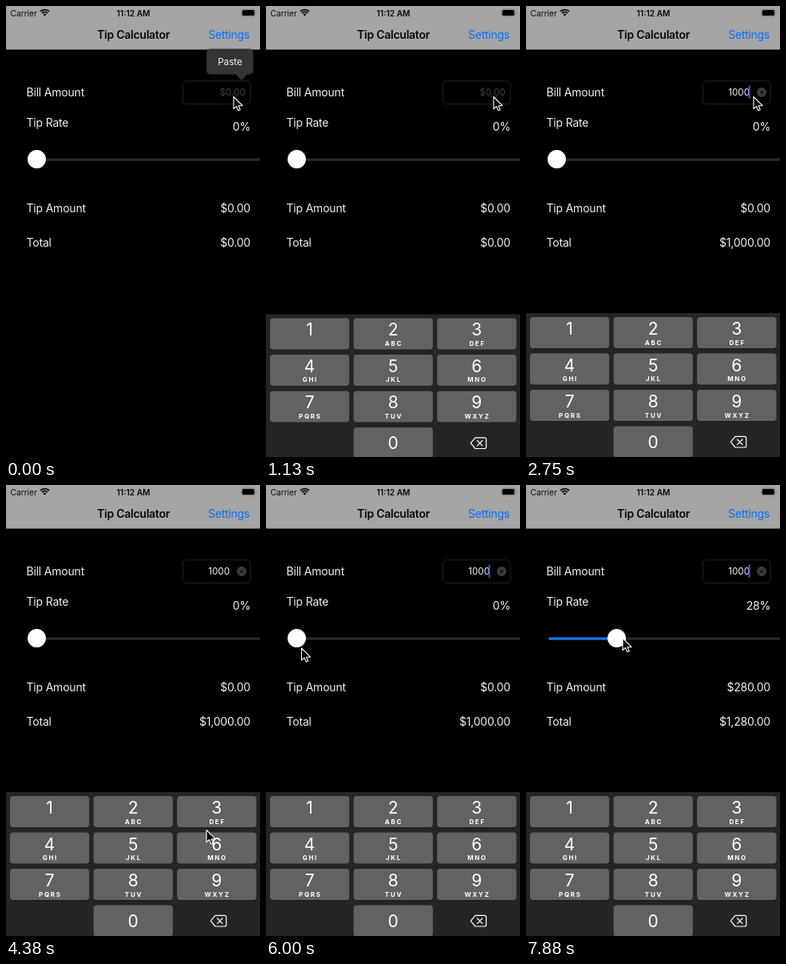
Recreate the animation shown at these times as an HTML page. Size 318x564 px, loop 8000 ms.

```html
<!DOCTYPE html>
<html lang="en">
<head>
<meta charset="utf-8">
<title>Tip Calculator</title>
<style>
  html, body { margin: 0; width: 100%; height: 100%; overflow: hidden; background: #000; }
  svg { display: block; width: 100vw; height: 100vh; }
  text { font: 14px Inter, Roboto, sans-serif; letter-spacing: -.2px; fill: #f2f2f2; }
  .end { text-anchor: end; }
  .mid { text-anchor: middle; }
  .status { font-size: 10.2px; letter-spacing: 0; fill: #0a0a0a; }
  .bold { font-weight: 600; }
  .title { letter-spacing: -.25px; fill: #080808; }
  .link { letter-spacing: -.25px; fill: #0570f2; }
  .small { font-size: 11.7px; letter-spacing: 0; }
  .digit { font-size: 21px; letter-spacing: 0; fill: #fff; }
  .letters { font-size: 8px; font-weight: 700; letter-spacing: 1.7px; fill: #fff; }
</style>
</head>
<body>
<svg viewBox="0 0 318 564">
  <rect width="318" height="564"/>
  <rect width="318" height="54.5" fill="#a5a5a5"/>

  <text class="status" x="5.5" y="12.5">Carrier</text>
  <g fill="none" stroke="#0a0a0a" stroke-width="1.9">
    <path d="M42.9 6.9A8 8 0 0 1 54.1 6.9"/>
    <path d="M45 9A5 5 0 0 1 52 9"/>
    <path d="M46.5 10.6A2.8 2.8 0 0 1 50.5 10.6L48.5 12.7Z" fill="#0a0a0a" stroke="none"/>
  </g>
  <text class="status bold mid" x="159.5" y="12.5">11:12 AM</text>
  <rect x="294.8" y="4" width="17" height="9" rx="2.4" fill="none" stroke="#747474" stroke-width=".8"/>
  <rect x="295.8" y="5" width="15" height="7" rx="1.5"/>
  <path d="M312.9 7A1.6 1.6 0 0 1 312.9 10Z" fill="#747474"/>

  <text class="title bold mid" x="159.5" y="41">Tip Calculator</text>
  <text class="link end" x="305" y="41">Settings</text>

  <text x="25.5" y="113.2">Bill Amount</text>
  <text x="25.5" y="150.5">Tip Rate</text>
  <text x="25.5" y="258.2">Tip Amount</text>
  <text x="25.5" y="300.7">Total</text>
  <text class="end" id="rate" x="306" y="156.3"></text>
  <text class="end" id="tip" x="306" y="258.2"></text>
  <text class="end" id="total" x="306" y="300.7"></text>

  <rect x="221.5" y="93.8" width="84.5" height="28.8" rx="4" fill="#000" stroke="#202022"/>
  <text class="small end" id="bill" y="112.2"></text>
  <rect id="caret" y="99.6" width="1.9" height="16.2" rx=".8" fill="#3566e6"/>
  <g id="clear">
    <circle cx="295" cy="108" r="6" fill="#3c3c3e"/>
    <path d="M292.8 105.8l4.4 4.4m0-4.4l-4.4 4.4" stroke="#000" stroke-width="1"/>
  </g>

  <rect x="28" y="190.4" width="290" height="3.4" fill="#29292b"/>
  <rect id="fill" x="28" y="190.4" height="3.4" rx="1.7" fill="#1a70ea"/>
  <circle id="thumb" cy="191.6" r="11.5" fill="#fff"/>

  <g id="paste">
    <path d="M256 53.5H304.5a5 5 0 0 1 5 5V80.5a5 5 0 0 1-5 5H302L295 93L288 85.5H256a5 5 0 0 1-5-5V58.5a5 5 0 0 1 5-5Z" fill="#343635"/>
    <text class="small mid" x="280.5" y="73.8">Paste</text>
  </g>

  <g id="keyboard">
    <rect y="384" width="318" height="184" fill="#252525"/>
    <g id="keys"></g>
    <g fill="none" stroke="#fff" stroke-width="1.2" stroke-linejoin="round">
      <path d="M262 538.4H273.7a2 2 0 0 1 2 2V550a2 2 0 0 1-2 2H262L256.3 545.2Z"/>
      <path d="M264.5 542l6.4 6.4m0-6.4l-6.4 6.4" stroke-linecap="round"/>
    </g>
  </g>

  <path id="pointer" d="M0 0V15.2L3.5 12L5.8 17.2L8.2 16.2L6 11.2H11Z" fill="#000" stroke="#fff" stroke-width="1.1" stroke-linejoin="round"/>
</svg>
<script>
const LOOP = 8000, STEP = 125;
const el = id => document.getElementById(id);
const clamp = v => Math.max(0, Math.min(1, v));
const money = v => '$' + v.toLocaleString('en-US', { minimumFractionDigits: 2, maximumFractionDigits: 2 });

// Keypad
const letters = ['', 'ABC', 'DEF', 'GHI', 'JKL', 'MNO', 'PQRS', 'TUV', 'WXYZ'];
const key = (col, row, digit, sub) => {
  const x = 5 + col * 104.6, y = 389 + row * 45.5, cx = x + 49.6;
  return `<rect x="${x}" y="${y + .8}" width="99.3" height="39" rx="4" fill="#181818"/>
    <rect x="${x}" y="${y}" width="99.3" height="39" rx="4" fill="#626262"/>
    <text class="digit mid" x="${cx}" y="${y + (digit ? 22 : 27)}">${digit}</text>
    <text class="letters mid" x="${cx + .8}" y="${y + 34.5}">${sub}</text>`;
};
el('keys').innerHTML =
  letters.map((sub, i) => key(i % 3, Math.floor(i / 3), i + 1, sub)).join('') + key(1, 3, 0, '');

// Pointer stops: time, x, y
const stops = [
  [0, 285, 113.5], [3600, 285, 113.5], [4375, 251, 431.5], [4750, 253, 448],
  [5250, 290, 279], [6000, 44.5, 204], [6250, 44.5, 204], [6400, 46, 196]
];

// Tip rate set by the slider
const slide = t => 28 * clamp((t - 6400) / 1475) ** 2;
const thumbX = t => 38.5 + 2.68 * slide(t);

function pointerAt(t) {
  const next = stops.findIndex(s => s[0] > t);
  if (next < 0) return [thumbX(t) + 7.5, 196 - 4.5 * clamp((t - 6400) / 900)];
  const [t0, x0, y0] = stops[next - 1], [t1, x1, y1] = stops[next];
  const u = (t - t0) / (t1 - t0), e = u * u * (3 - 2 * u);
  return [x0 + (x1 - x0) * e, y0 + (y1 - y0) * e];
}

function caretAt(t) {
  if (t >= 2000 && t < 2900) return 1;
  const phase = (t - (t < 2000 ? 0 : 100)) % 1000;
  return clamp(1 - (Math.abs(phase - 750) - 150) / 150);
}

// Critically damped rise of the keyboard
function keyboardAt(t) {
  const x = 0.01826 * Math.max(0, t - 749);
  return 182 * (1 + x) * Math.exp(-x);
}

function draw(t) {
  const typed = '1000'.slice(0, Math.max(0, Math.floor((t - 1750) / 250)));
  const bill = Number(typed), rate = Math.round(slide(t)), tip = bill * rate / 100;
  el('bill').textContent = typed || '$0.00';
  el('bill').setAttribute('x', typed ? 280 : 300);
  el('bill').style.fill = typed ? '#f2f2f2' : '#414143';
  el('clear').style.opacity = typed ? 1 : 0;
  el('caret').setAttribute('x', typed ? 278.6 : 298.8);
  el('caret').style.opacity = caretAt(t);

  el('rate').textContent = rate + '%';
  el('tip').textContent = money(tip);
  el('total').textContent = money(bill + tip);
  el('thumb').setAttribute('cx', thumbX(t));
  el('fill').setAttribute('width', thumbX(t) - 28);

  el('paste').style.opacity = clamp((1050 - t) / 230);
  el('keyboard').setAttribute('transform', `translate(0 ${keyboardAt(t)})`);
  el('pointer').setAttribute('transform', `translate(${pointerAt(t)})`);
}

// The picture advances in eighths of a second, rounded to 10 ms
function tick(now) {
  const t = now % LOOP;
  let i = Math.floor(t / STEP);
  if (10 * Math.round(i * STEP / 10) > t) i--;
  draw(i * STEP);
  requestAnimationFrame(tick);
}
draw(0);
requestAnimationFrame(tick);
</script>
</body>
</html>
```
